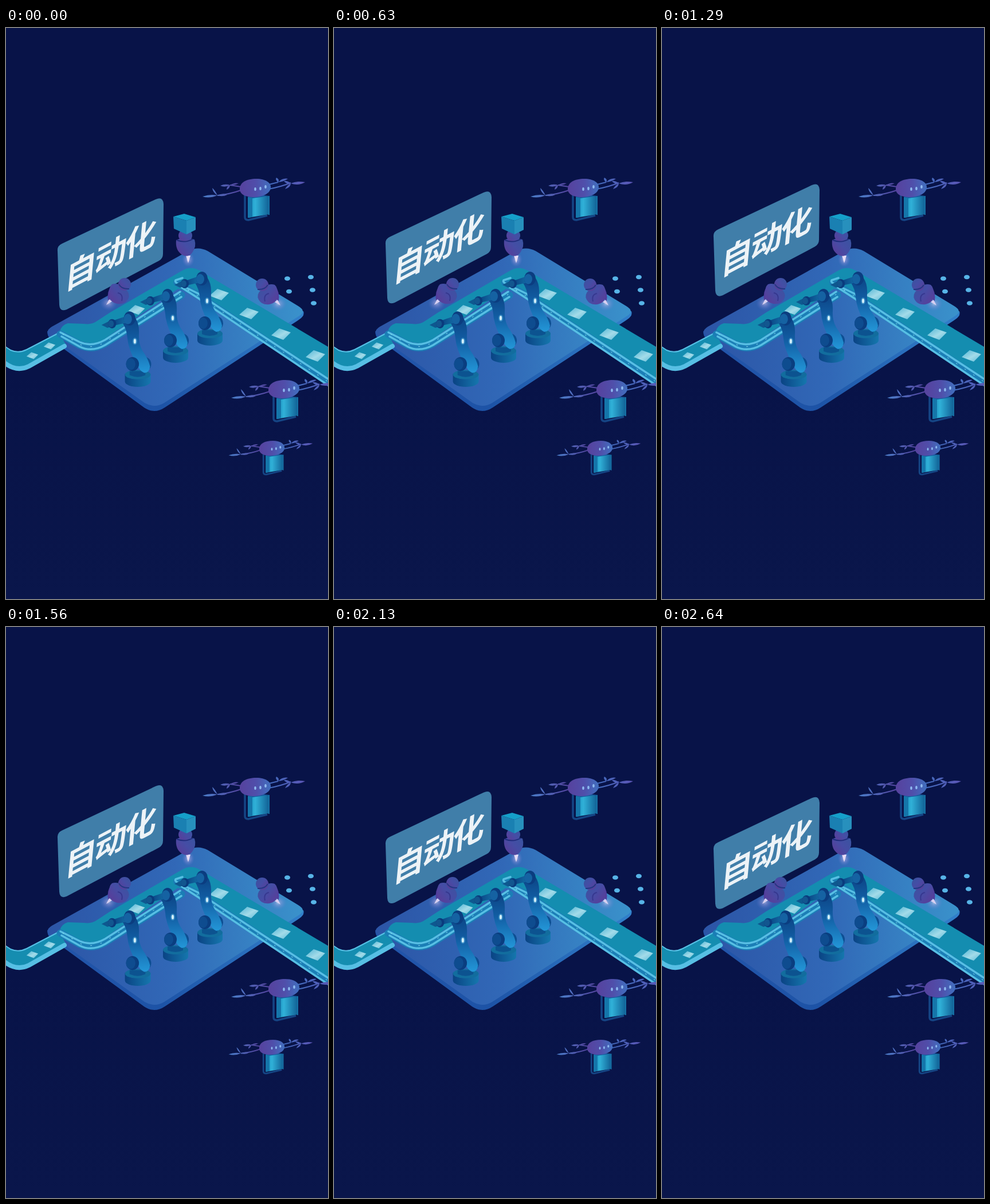
An HTML page that plays this animation: 562 by 996 pixels, repeating every 2.67 s.

```html
<!DOCTYPE html>
<html lang="zh-CN">
<head>
<meta charset="utf-8">
<title>自动化</title>
<style>
html, body { margin: 0; width: 100%; height: 100%; overflow: hidden; background: #081348; }
svg { display: block; width: 562px; height: 996px; background: linear-gradient(#081348 60%, #0a164b); }
text { font: 900 56px "Noto Sans CJK SC", "Noto Sans CJK", sans-serif; letter-spacing: -4px; text-anchor: middle; }
.rim { fill: none; stroke: #57bfe4; stroke-linejoin: round; stroke-linecap: round; }
</style>
</head>
<body>
<svg viewBox="0 0 562 996">
<defs>
  <linearGradient id="floor"><stop stop-color="#2c55a6"/><stop offset=".5" stop-color="#3168b7"/><stop offset="1" stop-color="#3a92cb"/></linearGradient>
  <linearGradient id="edge"><stop stop-color="#2355aa"/><stop offset=".45" stop-color="#1d53a6"/><stop offset="1" stop-color="#3280cb"/></linearGradient>
  <linearGradient id="parcel" x2="1" y2="1"><stop stop-color="#4fb4d4"/><stop offset=".55" stop-color="#a3dbe9"/><stop offset="1" stop-color="#5bbbd8"/></linearGradient>
  <linearGradient id="limb" x2="0" y2="1"><stop stop-color="#0b4283"/><stop offset=".45" stop-color="#125fa5"/><stop offset="1" stop-color="#2397d8"/></linearGradient>
  <linearGradient id="steel"><stop stop-color="#0a4384"/><stop offset="1" stop-color="#1577ad"/></linearGradient>
  <linearGradient id="hull" gradientUnits="userSpaceOnUse" x1="-92" x2="87"><stop stop-color="#4b7fcb"/><stop offset=".38" stop-color="#56439f"/><stop offset=".52" stop-color="#504eaa"/><stop offset=".65" stop-color="#426cbd"/><stop offset="1" stop-color="#5b55b5"/></linearGradient>
  <linearGradient id="skin" x1="1" x2="0" y2=".8"><stop stop-color="#38549f"/><stop offset=".5" stop-color="#454da5"/><stop offset="1" stop-color="#593d99"/></linearGradient>
  <linearGradient id="crate"><stop stop-color="#1687b8"/><stop offset=".35" stop-color="#30b1d8"/><stop offset="1" stop-color="#116196"/></linearGradient>
  <radialGradient id="glow"><stop stop-color="#fff"/><stop offset=".3" stop-color="#b9a9e5" stop-opacity=".8"/><stop offset="1" stop-color="#6a74cf" stop-opacity="0"/></radialGradient>

  <path id="box" d="M-17 3L-3 -9L17 -2L4 11Z" fill="url(#parcel)"/>

  <g id="arm">
    <path d="M-22 -22V-9A22 9 0 0 0 22 -9V-22Z" fill="url(#steel)"/>
    <ellipse cy="-21" rx="22" ry="8" fill="#126d9e"/>
    <path d="M-14 -27H13V-20Q0 -14 -14 -20Z" fill="#0c5390"/>
    <ellipse cx="12" cy="-39" rx="11" ry="12" fill="#0d4f93"/>
    <path d="M-27 -111Q-20 -127 -5 -119Q3 -108 2 -91Q1 -74 8 -62Q18 -48 21 -35Q20 -24 11 -24Q3 -27 -2 -40Q-16 -62 -18 -85Q-19 -99 -27 -111Z" fill="url(#limb)"/>
    <ellipse cx="-9" cy="-39" rx="11" ry="12" fill="#0a3e80"/>
    <ellipse cx="-12" cy="-39" rx="8" ry="10" fill="#0e4c8f"/>
    <path d="M-43 -113L-17 -122L-13 -111L-41 -105Z" fill="url(#steel)"/>
    <ellipse cx="-14" cy="-117" rx="10" ry="12" fill="#0b3d80"/>
    <ellipse cx="-17" cy="-116" rx="7" ry="9" fill="#1562a2"/>
    <path d="M-62 -106L-46 -114L-43 -104L-52 -101Z" fill="#0e588f"/>
    <ellipse cx="-44" cy="-108" rx="7" ry="8" fill="#0a3b7d"/>
    <ellipse cx="-46" cy="-108" rx="5" ry="6" fill="#12568f"/>
    <ellipse cx="-5" cy="-78" rx="4" ry="6" fill="#6ec8ee" opacity=".4"/>
    <ellipse cx="-5" cy="-78" rx="2" ry="4" fill="#d5f1fb"/>
  </g>

  <g id="drone">
    <g fill="none" stroke="url(#hull)" stroke-width="2.2">
      <path d="M-25 4Q-45 11 -66 13M-25 -2L-44 -5M20 -5L40 -10M23 2Q45 -2 62 -9"/>
    </g>
    <g fill="url(#hull)">
      <path d="M-92 15Q-78 10 -66 13Q-80 19 -92 15ZM-66 13Q-56 8 -49 12Q-57 16 -66 13ZM-75 0Q-70 4 -66 13Q-74 8 -75 0Z"/>
      <path d="M-61 -4Q-52 -8 -44 -5Q-53 0 -61 -4ZM-44 -5Q-36 -10 -29 -8Q-36 -4 -44 -5ZM-50 3Q-50 -3 -44 -5Q-44 0 -50 3Z"/>
      <path d="M40 -10Q34 -15 37 -18Q43 -15 40 -10ZM40 -10Q48 -18 57 -16Q50 -11 40 -10Z"/>
      <path d="M62 -8Q74 -13 87 -10Q74 -3 62 -8ZM62 -8Q56 -13 50 -12Q55 -6 62 -8ZM52 2Q56 -5 62 -8Q62 -1 52 2Z"/>
    </g>
    <path d="M-18 11V51Q-18 56 -12 56L21 48M-11 13V52" fill="none" stroke="#154585" stroke-width="3.5"/>
    <path d="M-13 16L24 14V46L-13 52Z" fill="url(#crate)"/>
    <path d="M-13 16L-5 18V51L-13 52Z" fill="#1576aa"/>
    <path d="M-13 16L-2 11L25 14L-5 18Z" fill="#185c9e"/>
    <path d="M24 14V47" stroke="#1671a5" stroke-width="2"/>
    <path d="M-27 2C-27 -10 -15 -16 2 -16C18 -16 28 -9 27 0C26 9 14 16 -3 16C-17 16 -27 11 -27 2Z" fill="url(#hull)"/>
    <g fill="#8db9f0"><ellipse cy="2" rx="1.8" ry="3"/><ellipse cx="9" cy="1" rx="1.8" ry="3"/><ellipse cx="18" cy="-2" rx="1.8" ry="3"/></g>
  </g>

  <g id="helper">
    <ellipse cx="179" cy="480" rx="15" ry="13" fill="url(#glow)" opacity=".5"/>
    <path d="M175 483L180 473L185 477Z" fill="#d9d0f2"/>
    <path d="M183 452Q176 459 178 475L184 471Z" fill="#503d9d"/>
    <path d="M185 447Q197 443 208 455Q218 464 213 473Q207 483 194 481Q181 478 180 466Q179 452 185 447Z" fill="url(#skin)"/>
    <ellipse cx="207" cy="447" rx="11" ry="11" fill="url(#skin)"/>
    <path d="M197 447Q202 456 215 455" fill="none" stroke="#243783" stroke-width="2"/>
    <path d="M195 462Q205 464 202 476" fill="none" stroke="#36388f" stroke-width="2"/>
  </g>
</defs>

<g id="sign">
  <path d="M90 389Q89 380 98 376L261 299Q274 293 275 307L274 394Q274 402 267 406L106 491Q94 496 93 483Z" fill="#407ea9"/>
  <text y="21" transform="matrix(1 -.53 -.1 1.04 181 396)" fill="#edf3f7">自动化</text>
</g>

<path d="M72 529L519 494Q522 502 511 509L277 662Q259 674 241 662L78 543Q72 538 72 529Z" fill="url(#edge)"/>
<path d="M80 521L318 389Q335 380 352 389L510 485Q525 494 512 502L276 654Q259 664 242 654L79 538Q66 530 80 521Z" fill="url(#floor)"/>

<path d="M-4 554L10 562Q23 567 36 561L92 531L105 553L40 590Q18 600 -4 583Z" fill="#158db0"/>
<path class="rim" d="M-4 554L8 562Q22 568 36 561L90 533" stroke-width="2"/>
<path class="rim" d="M-4 583Q18 601 40 590L102 555" stroke-width="8"/>
<use href="#box" transform="translate(46 571) scale(.6)"/>
<use href="#box" transform="translate(76 554) scale(.6)"/>

<path d="M94 529Q97 518 108 515L136 516Q150 518 159 511L182 496L306 424Q322 414 338 423L562 556V622L332 462L300 455L173 542Q154 555 132 547Z" fill="#148db0"/>
<g class="rim">
  <path d="M95 534L129 553Q150 563 173 550L306 466" stroke="#1b7eb6" stroke-width="13"/>
  <path d="M95 531L129 548Q150 557 173 544L304 460M97 538L129 556Q150 566 173 553L306 469" stroke-width="3.5"/>
  <path d="M298 444L335 466L562 617" stroke="#1b7eb6" stroke-width="12"/>
  <path d="M308 436L296 440Q294 443 300 446L335 463L562 612M301 449L335 471L562 623" stroke-width="3.5"/>
  <path d="M99 534L129 552Q150 561 173 548L305 464M302 448L335 467L562 617" stroke="#8fe0ef" stroke-width="1" stroke-dasharray="2 16"/>
</g>
<use href="#box" transform="translate(228 491) scale(.85)"/>
<use href="#box" x="372" y="464"/>
<use href="#box" x="424" y="497"/>
<use href="#box" x="480" y="533"/>
<use href="#box" x="540" y="571"/>

<use href="#arm" x="356" y="554"/>
<use href="#arm" x="296" y="584"/>
<use href="#arm" transform="translate(230 626) scale(1.02)"/>

<use href="#helper"/>
<use href="#helper" transform="matrix(-1 0 0 1 654 1)"/>

<ellipse cx="318" cy="404" rx="11" ry="13" fill="url(#glow)" opacity=".6"/>
<path d="M314 397L318 410L322 397Z" fill="#e6dcf6"/>
<path d="M297 370Q312 363 329 369Q333 381 325 392Q318 401 308 396Q295 388 297 370Z" fill="url(#skin)"/>
<ellipse cx="313" cy="362" rx="12" ry="11" fill="url(#skin)"/>
<path d="M298 370Q313 376 326 368" fill="none" stroke="#202d7d" stroke-width="2"/>
<path d="M292 329L311 324L331 330L315 336Z" fill="#159fc9"/>
<path d="M292 329L315 336V360L293 350Z" fill="#1a80b2"/>
<path d="M315 336L331 330V352L315 360Z" fill="#2790bd"/>

<g fill="#57b4e7">
  <ellipse cx="491" cy="437" rx="5" ry="3.8"/><ellipse cx="532" cy="434.5" rx="5" ry="3.8"/>
  <ellipse cx="494" cy="459.5" rx="5" ry="3.8"/><ellipse cx="535" cy="457" rx="5" ry="3.8"/>
  <ellipse cx="537" cy="480" rx="5" ry="3.8"/>
</g>

<use href="#drone" x="435" y="279"/>
<use href="#drone" x="485" y="630"/>
<use href="#drone" transform="translate(464 733) scale(.82)"/>
</svg>
<script>
const LOOP = 2670, RISE = 25.5;
const sign = document.getElementById("sign");

function draw(now) {
  const phase = now % LOOP / LOOP;
  const lift = RISE * (1 - Math.abs(1 - 2 * phase));
  sign.setAttribute("transform", `translate(0 ${-lift})`);
  requestAnimationFrame(draw);
}
requestAnimationFrame(draw);
</script>
</body>
</html>
```
